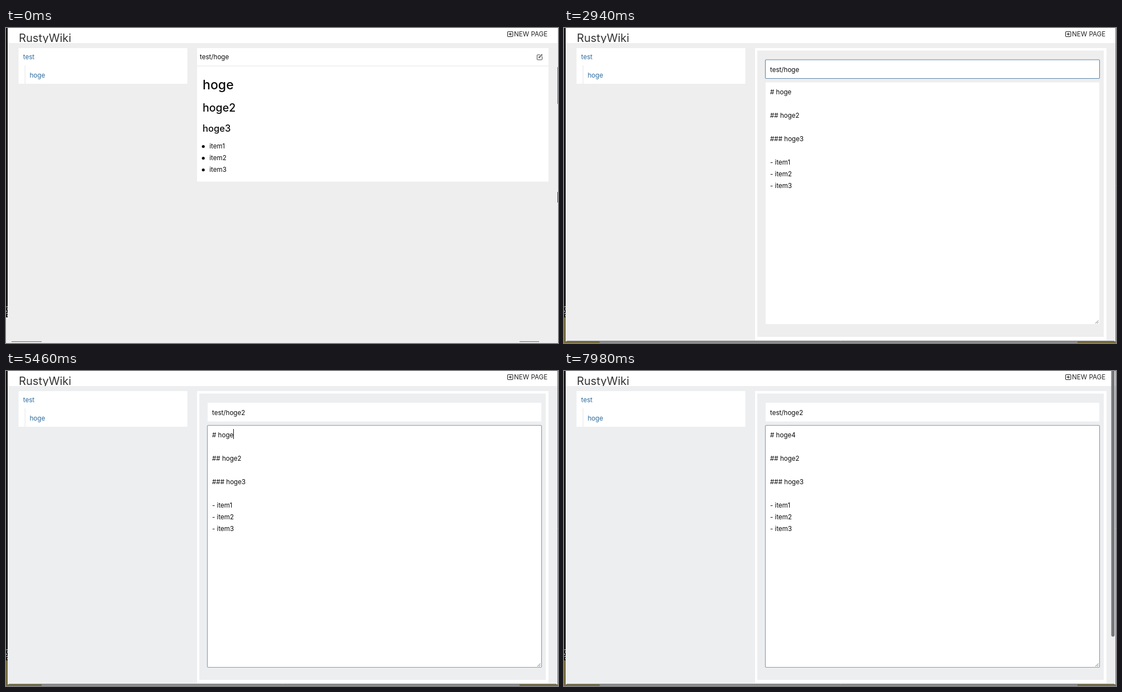
Recreate the animation shown at these times as an HTML page with a canvas. Size 991x565 px, loop 8 s.

```html
<!DOCTYPE html>
<html lang="en">
<head>
<meta charset="utf-8">
<title>Wiki editor</title>
<style>
  html, body { margin: 0; width: 100%; height: 100%; overflow: hidden; background: #eee; }
  canvas, svg { position: absolute; left: 0; top: 0; width: 991px; height: 565px; }
  text { font-family: Inter, "Noto Sans", sans-serif; font-size: 11.6px; fill: #0a0a0a; white-space: pre; }
  .brand { font-size: 20.1px; fill: #333; }
  .link { fill: var(--link); }
  .menu { fill: #222; }
  .h1, .h2, .h3 { font-weight: 500; }
  .h1 { font-size: 23.1px; }
  .h2 { font-size: 19.6px; }
  .h3 { font-size: 16.6px; }
</style>
</head>
<body>
<canvas id="stage" width="991" height="565"></canvas>
<svg viewBox="0 0 991 565">
  <clipPath id="bar"><rect width="991" height="27"/></clipPath>
  <g clip-path="url(#bar)"><text class="brand" x="23" y="25">RustyWiki</text></g>
  <text class="menu" x="912" y="15">NEW PAGE</text>
  <text class="link" x="30.8" y="56">test</text>
  <text class="link" x="42.5" y="89">hoge</text>
  <g id="view">
    <text x="348" y="56">test/hoge</text>
    <text class="h1" x="353" y="109.5">hoge</text>
    <text class="h2" x="353" y="150">hoge2</text>
    <text class="h3" x="353" y="186">hoge3</text>
  </g>
  <g id="edit"></g>
</svg>
<script>
const LOOP = 8000, STEP = 70, LINE = 21;
// moments of the story, in ms
const EDIT = 2380, FOCUS_PATH = 2940, CLICK_PATH = 3850, TYPE_PATH = 4690;
const FOCUS_BODY = 5320, TYPE_BODY = 7420;
const WHITE = 255, PAGE = 238, FADED = 246;
const OLIVE = '#756b3c', INK = '#222';

const $ = id => document.getElementById(id);
const ctx = $('stage').getContext('2d');
const view = $('view'), edit = $('edit');
const lerp = (a, b, k) => Math.round(a + (b - a) * k);
const grey = v => `rgb(${v},${v},${v})`;

function label(group, x, y, string) {
  const el = document.createElementNS('http://www.w3.org/2000/svg', 'text');
  el.setAttribute('x', x);
  el.setAttribute('y', y);
  el.textContent = string;
  group.append(el);
  return el;
}

const items = ['item1', 'item2', 'item3'];
items.forEach((item, i) => label(view, 365.3, 216 + i * LINE, item));
const path = label(edit, 370, 78.5, '');
const source = ['', '', '## hoge2', '', '### hoge3', '', ...items.map(item => '- ' + item)];
const [title] = source.map((row, i) => label(edit, 370, 119 + i * LINE, row));

function box(x, y, w, h, color) {
  ctx.fillStyle = color;
  ctx.fillRect(x, y, w, h);
}

function round(x, y, w, h, r, paint, color, width = 1.1) {
  ctx.fillStyle = ctx.strokeStyle = color;
  ctx.lineWidth = width;
  ctx.beginPath();
  ctx.roundRect(x, y, w, h, r);
  ctx[paint]();
}

function line(x1, y1, x2, y2, color, width = 1) {
  ctx.strokeStyle = color;
  ctx.lineWidth = width;
  ctx.beginPath();
  ctx.moveTo(x1, y1);
  ctx.lineTo(x2, y2);
  ctx.stroke();
}

function desktopEdges(editing) {
  box(0, 0, 3, 519, '#181818');
  for (let y = 499; y < 519; y += 4) box(y % 3, y, 1.5, 2, '#ccc');
  if (editing) {
    box(0, 519, 3, 46, OLIVE);
    box(0, 562, 991, 3, OLIVE);
    box(64, 562, 858, 3, '#8d8d8d');
    line(5, 561.5, 988, 561.5, '#777');
    line(990.5, 0, 990.5, 565, '#77745f');
  } else {
    line(10, 562.5, 64, 562.5, OLIVE);
    line(922, 562.5, 957, 562.5, OLIVE);
    line(990.5, 70, 990.5, 136, OLIVE);
    line(990.5, 294, 990.5, 313, '#444');
  }
}

function plusIcon(x, y) {
  round(x - 4.75, y - 4.5, 9.5, 9, 1.5, 'stroke', INK);
  line(x - 2.6, y, x + 2.6, y, INK, 1.2);
  line(x, y - 2.6, x, y + 2.6, INK, 1.2);
}

function pencilIcon(x, y, back) {
  round(x - 4.5, y - 4, 9, 9, 1, 'stroke', '#444', 1);
  line(x - 1, y + 1, x + 5, y - 5, back, 5);
  line(x - 1.5, y + 1.5, x + 4.5, y - 4.5, '#444', 2.4);
  line(x - 0.5, y + 0.5, x + 3.8, y - 3.8, back, 0.8);
}

function viewer(card, page) {
  box(343, 36, 631, 239.5, card);
  box(343, 67.5, 631, 1.5, page);
  pencilIcon(958, 52, card);
  items.forEach((_, i) => round(351.6, 209.9 + i * LINE, 5.2, 5.2, 2.6, 'fill', '#0a0a0a'));
}

// the caret follows the text end and blinks from the last action on
function caret(t, field, since) {
  if (t < since || (t - since) % 1060 >= 560) return;
  const x = +field.getAttribute('x') + field.getComputedTextLength();
  box(Math.round(x - 0.5), field.getAttribute('y') - 15, 1, 18, '#111');
}

function editor(t, page) {
  const onBody = t >= FOCUS_BODY;
  box(343, 36, 631, 524, '#fff');
  box(347, 40.5, 622, 513.5, page);
  box(362, 57, 599, 33.5, '#fff');
  box(362, 97.5, 599, 433.5, '#fff');
  if (onBody) round(361.5, 97.5, 600, 434, 1.5, 'stroke', '#7d9cb5');
  else if (t >= FOCUS_PATH) round(361.5, 57, 600, 33.5, 1.5, 'stroke', '#5b87ad');
  for (const size of [5.5, 2.5]) line(959.5 - size, 530, 959.5, 530 - size, '#666', 0.9);

  if (onBody) caret(t, title, t >= TYPE_BODY ? TYPE_BODY : FOCUS_BODY);
  else caret(t, path, t >= TYPE_PATH ? TYPE_PATH : CLICK_PATH);
  if (t >= TYPE_BODY) round(982.5, -4, 6, 480.5, 3, 'fill', '#77777a');
}

function draw(now) {
  const t = Math.floor((now % LOOP) / STEP) * STEP;
  const editing = t >= EDIT;
  const fade = editing ? 0 : Math.min(1, t / 840);
  const card = grey(lerp(WHITE, FADED, fade));
  const page = t >= FOCUS_BODY ? '#edeef0' : grey(lerp(PAGE, FADED, fade));

  view.style.display = editing ? 'none' : '';
  edit.style.display = editing ? '' : 'none';
  path.textContent = t >= TYPE_PATH ? 'test/hoge2' : 'test/hoge';
  title.textContent = t >= TYPE_BODY ? '# hoge4' : '# hoge';
  document.body.style.setProperty('--link', `hsl(207 ${lerp(58, 32, fade)}% ${lerp(39, 42, fade)}%)`);

  box(0, 0, 991, 565, page);
  box(3, 0, 987, 27, card);
  plusIcon(905.25, 11);
  box(22.5, 36, 303, 64, card);
  box(33.5, 67, 1.5, 33, page);
  if (editing) editor(t, page);
  else viewer(card, page);
  desktopEdges(editing);
}

const start = performance.now();
function tick() {
  draw(performance.now() - start);
  requestAnimationFrame(tick);
}
tick();
</script>
</body>
</html>
```
